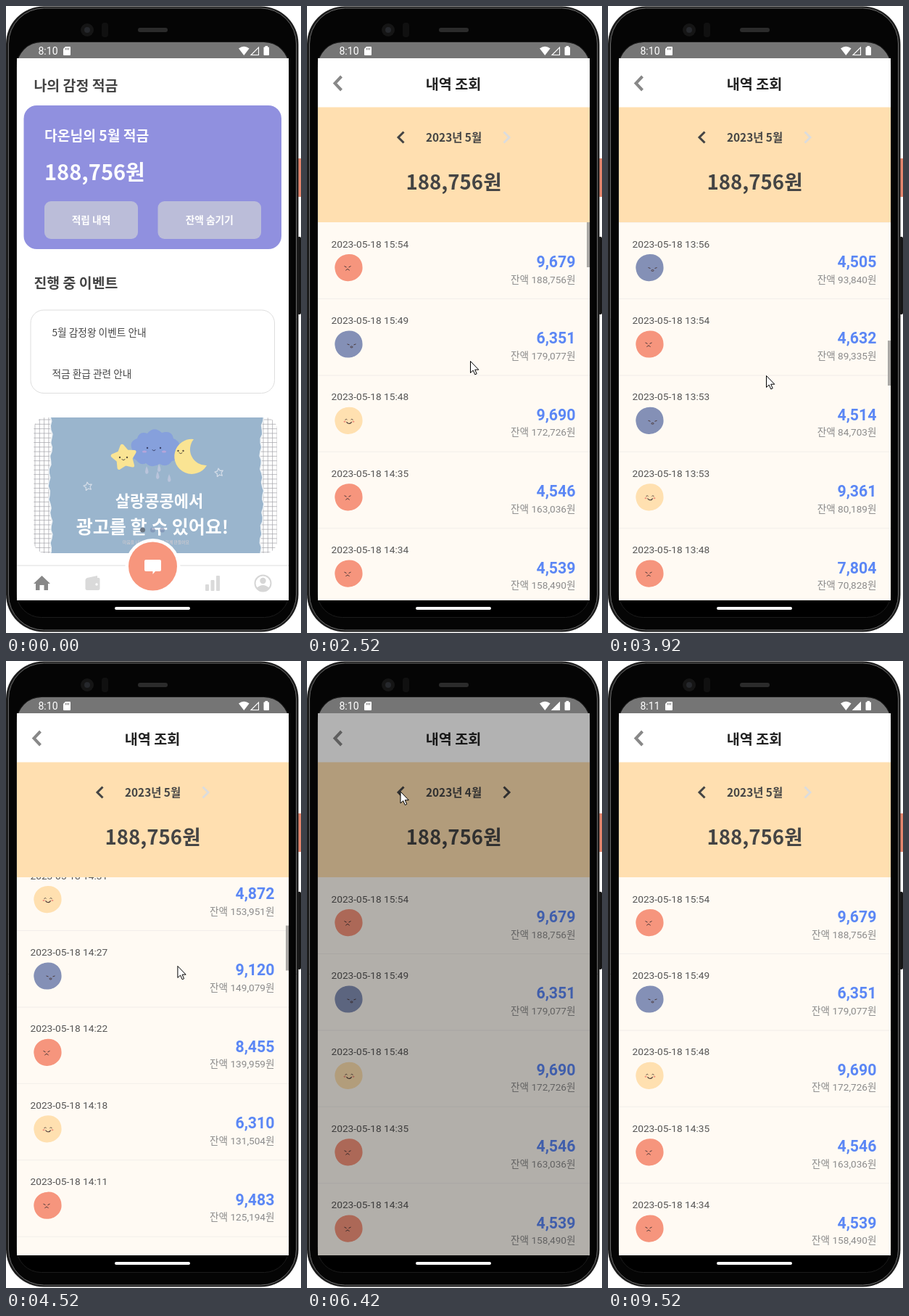
Recreate the animation shown at these times as an HTML page with a canvas. Size 407 by 864 pixels, loop 9890 ms.

```html
<!DOCTYPE html>
<html lang="ko">
<head>
<meta charset="utf-8">
<style>
html, body { margin: 0; width: 100%; height: 100%; overflow: hidden; background: #fff; }
canvas { display: block; }
</style>
</head>
<body>
<canvas id="stage" width="407" height="864"></canvas>
<script>
const ctx = document.getElementById('stage').getContext('2d');
const LOOP = 9890, TAU = Math.PI * 2;
const KR = '"Noto Sans CJK KR", "Noto Sans CJK", sans-serif';
const ROBOTO = 'Roboto, ' + KR;
const PAGE = { x: 15, y: 72, w: 375, h: 747 };
const LIST_TOP = 298, LIST_H = 521, ROW_H = 105.4, CONTENT_H = 4378;

// Keyframe tracks: [time, value...]
const CURSOR = [[330, 225, -22], [830, 126.5, 288.5], [1980, 126.5, 288.5], [2120, 136, 302],
  [2520, 225.5, 489.5], [2730, 225.5, 489.5], [2950, 240, 345], [3500, 222, 400], [3920, 218.5, 509.5],
  [4160, 225, 640], [4600, 238, 400], [4820, 246, 520], [5110, 250.5, 411.5], [5650, 215, 187],
  [5930, 129, 180], [6820, 129, 180], [7350, 280, 181], [7750, 283, 182.5], [7900, 283, 182.5],
  [8400, 302, 205], [9130, 303, 205], [9520, 343, -25]];
const DIM = [[1160, 0], [1300, .3], [1960, .3], [2110, 0], [6050, 0], [6170, .3], [6500, .3],
  [6680, 0], [7450, 0], [7580, .3], [7800, .3], [8000, 0]];
const SCROLL = [[2730, 0], [3920, 13 * ROW_H], [4990, 0]];
const STRETCH = [[4960, 0], [5110, .035], [5480, 0]];
const THUMB = [[5650, 1], [5900, 0], [7829, 0], [7830, 1], [8150, 1], [8400, 0]];
const BANNER = [[0, 3.7], [420, 0]];
const HOME_ZOOM = [[1240, 1], [1690, 1.1]];
const VEIL = [[1330, 0], [1570, 1]];
const LIST_FADE = [[1480, 0], [1640, 1]];

const AMOUNTS = [9679, 6351, 9690, 4546, 4539, 4872, 9120, 8455, 6310, 9483, 7256, 5921, 8694,
  4505, 4632, 4514, 9361, 7804, 4380];
const TIMES = ('15:54 15:49 15:48 14:35 14:34 14:31 14:27 14:22 14:18 14:11 14:06 14:02 13:58 ' +
  '13:56 13:54 13:53 13:53 13:48 13:45').split(' ');
const MOODS = 'rbyrrybryrbyrbrbyrb';
const MOOD_COLORS = { r: '#f6957d', b: '#8490b6', y: '#ffe0b0' };
let balance = 188756;
const rows = AMOUNTS.map((amount, i) => {
  const row = { amount, balance, time: TIMES[i], mood: MOODS[i] };
  balance -= amount;
  return row;
});

function track(keys, t) {
  const i = keys.findIndex(k => k[0] > t);
  if (i < 0) return keys[keys.length - 1].slice(1);
  if (i === 0) return keys[0].slice(1);
  const a = keys[i - 1], b = keys[i], u = (t - a[0]) / (b[0] - a[0]), e = u * u * (3 - 2 * u);
  return a.slice(1).map((v, j) => v + (b[j + 1] - v) * e);
}
const value = (keys, t) => track(keys, t)[0];
const between = (t, from, to) => t >= from && t < to;

function paint(fill, stroke, width = 1) {
  if (fill) { ctx.fillStyle = fill; ctx.fill(); }
  if (stroke) { ctx.strokeStyle = stroke; ctx.lineWidth = width; ctx.stroke(); }
}
function box(x, y, w, h, r, fill, stroke, width) {
  ctx.beginPath(); ctx.roundRect(x, y, w, h, r); paint(fill, stroke, width);
}
function oval(x, y, rx, ry, fill, stroke, width, from = 0, to = TAU) {
  ctx.beginPath(); ctx.ellipse(x, y, rx, ry, 0, from, to); paint(fill, stroke, width);
}
function shape(d, fill, stroke, width) {
  const p = new Path2D(d);
  if (fill) { ctx.fillStyle = fill; ctx.fill(p); }
  if (stroke) { ctx.strokeStyle = stroke; ctx.lineWidth = width; ctx.stroke(p); }
}
function text(str, x, y, size, weight, color, align = 'left', family = KR) {
  ctx.font = `${weight} ${size}px ${family}`;
  ctx.textAlign = align; ctx.fillStyle = color;
  ctx.fillText(str, x, y);
}
function group(draw) { ctx.save(); draw(); ctx.restore(); }
function zoomed(scale, draw) {
  group(() => {
    ctx.translate(202.5, 445.5); ctx.scale(scale, scale); ctx.translate(-202.5, -445.5);
    draw();
  });
}
function star(x, y, r, inner, fill, stroke, width) {
  ctx.beginPath();
  for (let i = 0; i < 10; i++) {
    const a = i * TAU / 10 - 1.75, d = i % 2 ? inner : r;
    ctx.lineTo(x + d * Math.cos(a), y + d * Math.sin(a));
  }
  ctx.closePath(); paint(fill, stroke, width);
}
function smile(x, y, gap, color) {
  oval(x - gap, y, 1.2, 1.2, color);
  oval(x + gap, y, 1.2, 1.2, color);
  oval(x, y + 1.5, 2.2, 2.2, null, color, 1, .3, 2.8);
}

function drawPhone() {
  box(402, 210, 6, 53, 1, '#e5866e');
  box(402, 318, 5, 107, 2, '#151515');
  box(0, .5, 403.5, 862, 52, '#1c1c1c');
  box(3.5, 3, 397, 857, 49, '#050505', '#6a6a6a', 1);
  oval(112, 33, 9, 9, '#151515');
  oval(112, 33, 4, 4, '#26282c');
  box(132, 23, 9, 20, 4, '#101010');
  box(182, 30, 41, 6, 3, '#2b2b2b');
  box(14.5, 49.5, 376, 793, 34, '#000', '#1c1c1c', 1);
  box(15, 50, 375, 40, [34, 34, 0, 0], '#757575');
  box(150, 828, 104, 4, 2, '#fff');
}

function drawStatus(t) {
  text(t < 7000 ? '8:10' : '8:11', 44.5, 67, 14, 400, '#fff', 'left', ROBOTO);
  shape('M82 56H88Q89 56 89 57V67Q89 68 88 68H80Q79 68 79 67V59Z', '#fff');
  shape('M82.5 58V60.5M84.5 58V60.5M86.5 58V60.5', null, '#757575', 1);
  shape('M328.3 68L321 58.5Q328.3 53 335.6 58.5Z', '#fff');
  shape('M348.5 57V67.5H338Z', t < 6250 ? null : '#fff', '#fff', 1.1);
  box(355.5, 56.5, 7.5, 11.5, 1, '#fff');
  box(357.5, 55, 3.5, 2, 0, '#fff');
}

function drawBanner(shift) {
  group(() => {
    ctx.translate(shift - 3.7, 0);
    ctx.beginPath(); ctx.roundRect(38.3, 567, 335.5, 187, 16); ctx.clip();
    ctx.beginPath();
    for (let x = 40; x < 374; x += 6.3) { ctx.moveTo(x, 567); ctx.lineTo(x, 754); }
    for (let y = 570; y < 754; y += 6.3) { ctx.moveTo(38, y); ctx.lineTo(374, y); }
    paint('#fff', '#a2a2a8', .7);

    const tear = i => 1.3 * Math.sin(i * 1.9) + 1.8 * Math.sin(i * .3);
    ctx.beginPath();
    for (let i = 0; i <= 32; i++) ctx.lineTo(61 + tear(i), 566 + i * 6);
    for (let i = 32; i >= 0; i--) ctx.lineTo(353 + tear(i + 7), 566 + i * 6);
    ctx.closePath(); paint('#9ab5cd', '#eef2f5', 1.5);

    ctx.lineJoin = 'round';
    shape('M180 626Q171 622 174 611Q169 600 181 596Q184 585 195 589Q204 578 215 588Q229 584 231 596Q243 601 238 612Q242 625 229 627Q222 637 212 631Q201 638 193 630Q186 634 180 626Z', '#86a0dc');
    smile(204, 609, 9, '#3b426a');
    oval(191, 614, 3, 1.6, '#b5a5da');
    oval(218, 614, 3, 1.6, '#b5a5da');
    star(163, 622, 16, 9, '#fae493', '#fae493', 5);
    smile(162, 622, 5, '#5b5040');
    shape('M259 597A24 24 0 1 0 277 633A22 22 0 0 1 259 597Z', '#fae493');
    smile(241, 613, 3.5, '#5b5040');
    for (const [x, y] of [[194, 640], [209, 647], [225, 651], [211, 637]])
      shape(`M${x} ${y - 6}Q${x + 5} ${y + 4} ${x} ${y + 5}Q${x - 4} ${y + 4} ${x} ${y - 6}Z`, '#b9c4db');
    star(113, 662, 6, 3, null, '#d5dde8', 1.2);
    star(294, 643, 6, 3, null, '#d5dde8', 1.2);
    text('살랑콩콩에서', 211.5, 690, 22, 700, '#fff', 'center');
    text('광고를 할 수 있어요!', 202, 727, 25, 700, '#fff', 'center');
    text('마음을 나누는 작은 공간 함께 만들어요', 207, 741, 5.8, 400, '#d9cfd0', 'center');
  });
  [188.5, 202.5, 215.5].forEach((x, i) => oval(x, 722, 3.5, 3.5, i ? '#7789ad99' : '#6b7683'));
}

function drawTabs() {
  box(15, 771, 375, 48, 0, '#fff');
  box(15, 770.5, 375, 1, 0, '#dedede');
  oval(202.5, 772, 38, 38, '#fff');
  oval(202.5, 772, 33.5, 33.5, '#f7967d');
  shape('M193 763H212Q214 763 214 765V777Q214 779 212 779H206L202.5 783V779H193Q191 779 191 777V765Q191 763 193 763Z', '#fff');
  shape('M49.5 785L61 796H58V805H52.5V798H46.5V805H41V796H38Z', '#888');
  shape('M112 788L126 785V788H128Q129.5 788 129.5 790V803Q129.5 805 127 805H112Q109.5 805 109.5 803V791Q109.5 789 112 788Z', '#dadada');
  oval(125, 797, 1.7, 1.7, '#fff');
  box(275, 797, 5, 9, 1, '#dadada');
  box(282.5, 791, 5, 15, 1, '#dadada');
  box(290, 785, 5, 21, 1, '#dadada');
  oval(354.5, 795.5, 11, 11, null, '#d6d6d6', 2);
  oval(354.5, 792, 4.2, 4.2, '#d6d6d6');
  shape('M346 802Q354.5 794 363 802Q354.5 810 346 802Z', '#d6d6d6');
}

function drawHome(t) {
  box(0, 60, 407, 780, 0, '#fff');
  text('나의 감정 적금', 38.5, 117, 19.4, 700, '#444');
  box(24.5, 137, 355.5, 198, 18, '#9090df');
  text('다온님의 5월 적금', 53, 186, 19.3, 700, '#fff');
  text('188,756원', 53, 240, 29, 700, '#fff');
  group(() => {
    if (t >= 980) ctx.globalAlpha *= .2;
    box(53, 269, 129, 52, 9, '#bbbdd9');
    text('적립 내역', 117.5, 300, 13.7, 700, '#fff', 'center');
  });
  box(209.5, 269, 142.5, 52, 9, '#bbbdd9');
  text('잔액 숨기기', 280.7, 300, 13.7, 700, '#fff', 'center');
  text('진행 중 이벤트', 38.5, 388.5, 19.4, 700, '#444');
  box(34, 419, 336.5, 114.5, 18, '#fff', '#dedede', 1);
  text('5월 감정왕 이벤트 안내', 63.5, 455, 13.7, 400, '#444');
  text('적금 환급 관련 안내', 63.5, 511.5, 13.7, 400, '#444');
  drawBanner(value(BANNER, t));
  if (t < 1160) drawTabs();
}

function drawMood(mood) {
  group(() => {
    ctx.translate(57.5, 62.5);
    shape('M-19 2C-20 -9 -12 -18 0 -18.5C11 -19 19 -11 19 -1C20 9 11 18 1 18.5C-10 20 -18 12 -19 2Z', MOOD_COLORS[mood]);
    const ink = '#4a3838';
    if (mood === 'r') {
      shape('M-6 -2L-3 -.5M3 -2L0 -.5', null, ink, 1);
      shape('M-4 4Q-1.5 0 1 4', null, ink, 1);
    } else if (mood === 'b') {
      shape('M-2 0L1 1M10 0L7 1', null, ink, 1);
      oval(4, 4, 1.6, 1, null, ink, .9);
    } else {
      shape('M-5 -1L-3 -2L-2 -1M3 -1L4 -2L6 -1', null, ink, .9);
      oval(.5, 1, 3.5, 3, null, ink, 1.1, .2, 2.9);
      oval(-5.5, 1.5, 1.5, 1, '#ee8f7c');
      oval(6.5, 1.5, 1.5, 1, '#ee8f7c');
    }
  });
}

function drawRows(t) {
  const scroll = value(SCROLL, t), s = value(STRETCH, t);
  rows.forEach((row, i) => {
    const y = i * ROW_H - scroll;
    if (y < -ROW_H || y > LIST_H) return;
    group(() => {
      ctx.translate(0, LIST_TOP + y * (1 + s * (1 - y / (2 * LIST_H))));
      ctx.scale(1, 1 + s * (1 - y / LIST_H));
      text('2023-05-18 ' + row.time, 33.5, 34.5, 13.7, 400, '#555', 'left', ROBOTO);
      drawMood(row.mood);
      text(row.amount.toLocaleString('en-US'), 370.5, 62, 21.3, 700, '#5b87f5', 'right', ROBOTO);
      text(`잔액 ${row.balance.toLocaleString('en-US')}원`, 370.5, 83.5, 13.6, 400, '#8b8b8b', 'right', ROBOTO);
      box(15, 105, 375, 1, 0, '#f2eeea');
    });
  });
  ctx.globalAlpha *= value(THUMB, t);
  box(386, LIST_TOP + scroll * LIST_H / CONTENT_H, 4, 62 * (1 + s), 0, '#aaa8a5');
}

function drawPig() {
  const skin = '#fb958c', dark = '#e67e79', ink = '#5a2f35';
  ctx.lineCap = 'round';
  box(165, 525.5, 78, 3, 1.5, '#a39a96');
  shape('M250 472Q258 474 257 468Q253 463 251 469Q254 478 261 471', null, dark, 2);
  oval(221, 481, 30.5, 29.5, skin);
  shape('M174 495H243Q246 506 241 513Q239 520 243 524Q242 527 238 527H219Q215 526 217 520V510H194V520Q196 526 192 527H176Q173 526 174 520Z', skin);
  box(175, 514, 18, 12.5, 3, dark);
  box(218, 514, 22, 12.5, 3, dark);
  box(211, 454, 16, 4.5, 2, '#a84d50');
  shape('M157 467L159 449L174 459ZM181 458L195 448L198 467Z', dark);
  oval(177, 479, 25.5, 25, skin);
  shape('M165 473L173 472M182 472L190 473M166 477L171 479L166 482M189 477L184 479L189 482', null, ink, 1.6);
  oval(177, 491, 9, 6.5, '#d96868');
  oval(174, 491, 1.5, 2.2, ink);
  oval(180, 491, 1.5, 2.2, ink);
  box(172, 497.5, 11, 4, 2, '#fff');
  oval(219, 438.5, 5.5, 5.5, '#f2897b');
  oval(219, 438.5, 3, 3, null, '#b85a55', 1);
}

function chevron(x, y, dx, dy, color, width, pressed) {
  group(() => {
    if (pressed) ctx.globalAlpha *= .2;
    shape(`M${x + dx} ${y - dy}L${x} ${y}L${x + dx} ${y + dy}`, null, color, width);
  });
}

function drawHistory(t) {
  const april = between(t, 6100, 7520);
  const empty = t < 1960 || between(t, 6480, 7830);
  box(15, 72, 375, 68, 0, '#fff');
  box(15, 139.5, 375, 159, 0, '#ffdfb0');
  box(15, LIST_TOP, 375, LIST_H, 0, '#fffaf3');
  chevron(38.5, 106.5, 9, 9.5, '#888', 4);
  text('내역 조회', 202, 114.5, 19.6, 700, '#222', 'center');
  chevron(126, 181, 7.5, 7.5, '#444', 3, between(t, 5960, 6200));
  chevron(279, 181, -7.5, 7.5, april ? '#444' : '#dcdcdc', 3, between(t, 7380, 7850));
  text(`2023년 ${april ? 4 : 5}월`, 202.5, 186.5, 15.4, 700, '#444', 'center');
  text(empty ? '0원' : '188,756원', 202.5, 252.5, 27.6, 700, '#444', 'center');
  group(() => {
    ctx.beginPath(); ctx.rect(15, LIST_TOP, 375, LIST_H); ctx.clip();
    if (!empty) return drawRows(t);
    drawPig();
    text('해당 월의 적금 내역이 없어요.', 202, 572.5, 13.7, 400, '#666', 'center');
  });
}

function drawCursor(t) {
  const [x, y] = track(CURSOR, t);
  group(() => {
    ctx.translate(x, y);
    shape('M0 0V16L3.7 12.6L6.3 18.4L8.7 17.3L6.2 11.7H11.3Z', '#fff', '#000', 1);
  });
}

function render(t) {
  const cover = color => box(PAGE.x, PAGE.y, PAGE.w, PAGE.h, 0, color);
  ctx.clearRect(0, 0, 407, 864);
  drawPhone();
  drawStatus(t);
  group(() => {
    ctx.beginPath(); ctx.rect(PAGE.x, PAGE.y, PAGE.w, PAGE.h); ctx.clip();
    if (t < 1640) {
      zoomed(value(HOME_ZOOM, t), () => drawHome(t));
      cover(`rgba(255,255,255,${value(VEIL, t)})`);
    }
    if (t > 1480) group(() => {
      ctx.globalAlpha = value(LIST_FADE, t);
      drawHistory(t);
    });
    cover(`rgba(0,0,0,${value(DIM, t)})`);
  });
  drawCursor(t);
}

function tick() {
  render(performance.now() % LOOP);
  requestAnimationFrame(tick);
}
tick();
</script>
</body>
</html>
```
